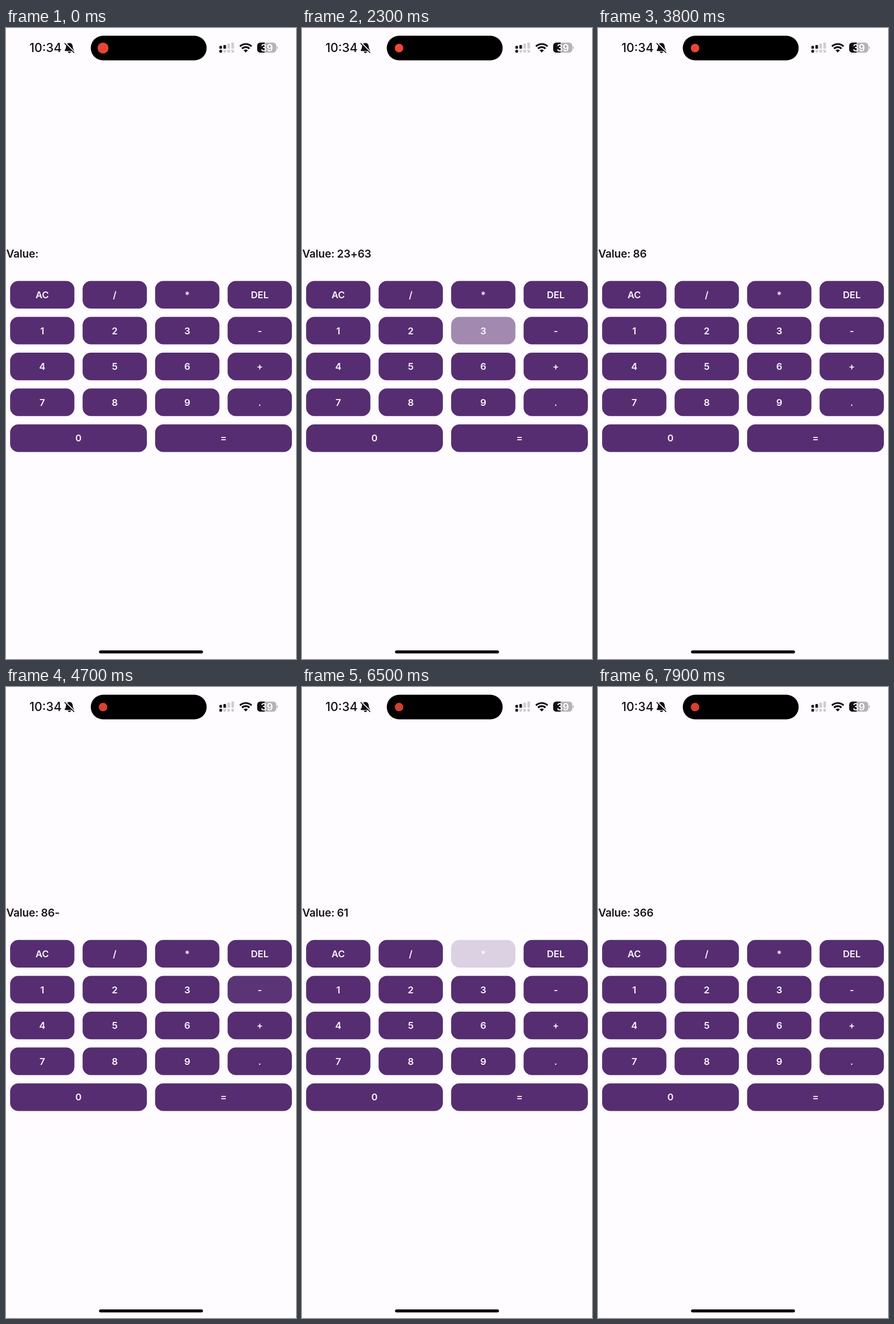
Write an HTML page that moves like this. It is 508 px wide and 1102 px high and loops after 8 s.

```html
<!DOCTYPE html>
<html lang="en">
<head>
<meta charset="utf-8">
<title>Calculator</title>
<style>
  html, body { margin: 0; width: 100%; height: 100%; overflow: hidden; background: #fefcff; }
  svg { display: block; width: 100%; height: 100%; }
  text { font-family: Inter, "Liberation Sans", sans-serif; }
  .value { font-size: 19px; font-weight: 600; letter-spacing: -.2px; fill: #17151a; }
  .key rect { fill: #562d71; }
  .key text { font-size: 16.5px; font-weight: 600; fill: #fbf7fd; text-anchor: middle; }
</style>
</head>
<body>
<svg id="stage" viewBox="0 0 508 1102">
  <text x="41" y="42" font-size="21.3" font-weight="500" fill="#111">10:34</text>

  <g id="bell">
    <path fill="#111" d="M111 26.2c-3.9 0-5.7 2.7-5.9 6.2-.2 3.2-.9 4.4-2 5.8-.8 1-.2 2 .8 2h14.2c1 0 1.600-1 .8-2-1.100-1.400-1.800-2.600-2-5.800-.2-3.500-2-6.200-5.900-6.200zM108.500 41.200h5.200a2.600 2.500 0 0 1-5.200 0z"/>
    <path d="M104.300 26.600 120 42.300" stroke="#fefcff" stroke-width="2.400"/>
    <path d="M103 27 119 43" stroke="#111" stroke-width="1.700" stroke-linecap="round"/>
  </g>

  <rect x="148.500" y="13.500" width="203" height="43" rx="21.500"/>
  <circle id="dot" cx="170" cy="35" r="7.500"/>

  <g id="signal"></g>

  <g fill="none" stroke="#111" stroke-width="3.100">
    <path d="M409.800 32.200a14.600 14.600 0 0 1 20.400 0"/>
    <path d="M413.500 36.100a9.200 9.200 0 0 1 13 0"/>
    <path fill="#111" stroke="none" d="M416.200 39a5.400 5.400 0 0 1 7.600 0l-3.800 3.800z"/>
  </g>

  <clipPath id="cell"><rect x="440" y="25.500" width="33.500" height="17.500" rx="5.500"/></clipPath>
  <g clip-path="url(#cell)">
    <rect x="440" y="25" width="34" height="19" fill="#b5b3b7"/>
    <rect x="440" y="25" width="13" height="19" fill="#111"/>
  </g>
  <path d="M474.500 31.500q1.800.8 1.800 2.900t-1.800 2.900z" fill="#b5b3b7"/>
  <text x="456.800" y="40.500" font-size="17" font-weight="600" fill="#fff" text-anchor="middle">39</text>

  <text class="value" x="0.500" y="401">Value:</text>
  <text class="value" id="value" x="61.300" y="401"></text>
  <g id="keys"></g>

  <rect x="163" y="1087" width="182" height="5.200" rx="2.600"/>
</svg>
<script>
const LOOP = 8000, STEP = 100, HOLD = 130, FADE = 250, DIM = 0.2;
const $ = id => document.getElementById(id);

function add(parent, tag, attrs, label) {
  const el = document.createElementNS(parent.namespaceURI, tag);
  for (const name in attrs) el.setAttribute(name, attrs[name]);
  if (label) el.textContent = label;
  return parent.appendChild(el);
}

// Signal strength: a rising row of bars above a row of squares
[5, 6.5, 9, 11].forEach((h, i) => {
  const x = 373.8 + i * 7;
  const bar = (y, height, on) => add($('signal'), 'rect',
    { x, y, width: 4.6, height, rx: 1.1, fill: on ? '#111' : '#cfcdd1' });
  bar(36.3 - h, h, i < 2);
  bar(38.2, 4.8, i < 1);
});

const keys = {};
const rows = [['AC', '/', '*', 'DEL'], ['1', '2', '3', '-'], ['4', '5', '6', '+'], ['7', '8', '9', '.'], ['0', '=']];
rows.forEach((row, r) => {
  const pitch = 508 / row.length, width = pitch - 14.4, y = 441.8 + r * 62.6;
  row.forEach((label, c) => {
    const x = 7.2 + c * pitch;
    const key = keys[label] = add($('keys'), 'g', { class: 'key' });
    add(key, 'rect', { x, y, width, height: 48.2, rx: 14.5 });
    add(key, 'text', { x: x + width / 2, y: y + 30.1 }, label);
  });
});

// Key, release time, value shown from then on
const taps = [
  ['2', 480, '2'], ['3', 830, '23'], ['+', 1490, '23+'], ['6', 1900, '23+6'], ['3', 2183, '23+63'], ['=', 2834, '86'],
  ['-', 4487, '86-'], ['2', 5450, '86-2'], ['5', 5690, '86-25'], ['=', 6030, '61'],
  ['*', 6560, '61*'], ['6', 6960, '61*6'], ['=', 7490, '366']
];

const clamp = v => Math.min(1, Math.max(0, v));
const easeInOut = p => p < 0.5 ? 2 * p * p : 1 - 2 * (1 - p) ** 2;
const mix = (a, b, k) => a + (b - a) * k;

function draw(t) {
  let value = '';
  for (const label in keys) keys[label].setAttribute('opacity', 1);
  for (const [label, up, result] of taps) {
    if (t >= up) value = result;
    if (t >= up - HOLD && t < up + FADE)
      keys[label].setAttribute('opacity', mix(DIM, 1, easeInOut(clamp((t - up) / FADE))));
  }
  $('value').textContent = value;

  const glow = 0.5 + 0.5 * Math.cos((t - 1000) / 1575 * 2 * Math.PI);
  const rgb = [mix(209, 255, glow), mix(63, 74, glow), mix(47, 55, glow)].map(Math.round);
  const settle = easeInOut(clamp(t / 400));
  $('dot').setAttribute('fill', `rgb(${t < 100 ? [233, 68, 54] : rgb})`);
  $('dot').setAttribute('r', mix(9.6, 7.5, settle));
}

function tick() {
  draw(Math.floor(performance.now() % LOOP / STEP) * STEP);
  requestAnimationFrame(tick);
}
tick();
</script>
</body>
</html>
```
